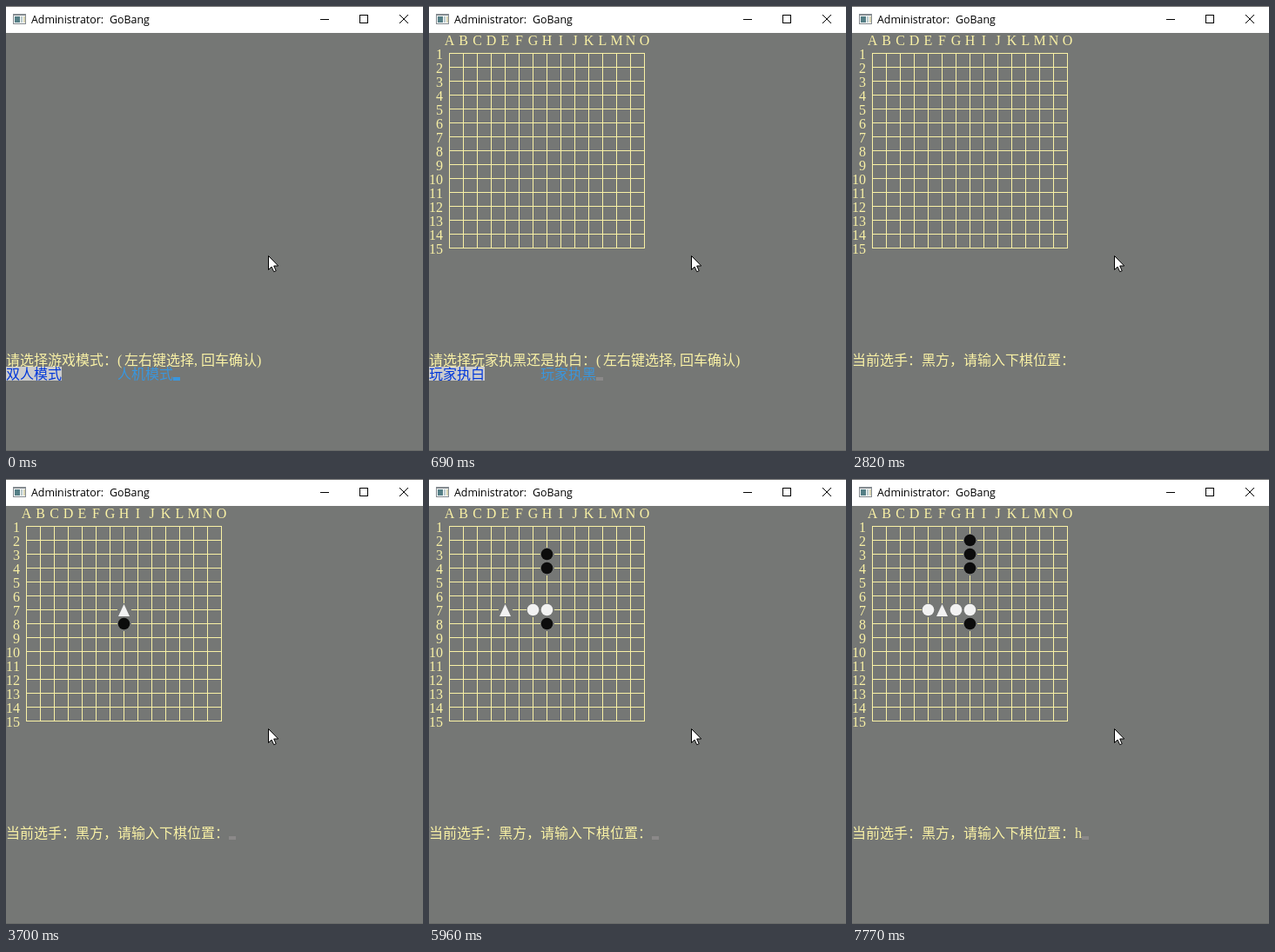
Write an HTML page with a canvas that moves like this. It is 479 px wide and 512 px high and loops after 8000 ms.

```html
<!DOCTYPE html>
<html lang="zh-CN">
<head>
<meta charset="utf-8">
<title>GoBang</title>
<style>
  html, body { margin: 0; width: 100%; height: 100%; overflow: hidden; background: #757775; }
  canvas { display: block; }
</style>
</head>
<body>
<canvas id="stage" width="479" height="512"></canvas>
<script>
const ctx = document.getElementById('stage').getContext('2d');
const LOOP = 8000, TOP = 31, CELL = 16, SIZE = 15;
const BG = '#757775', CREAM = '#f9f1a5', BLUE = '#3a96dd', NAVY = '#0037da',
      SILVER = '#cccccc', CARET = '#8b8989', BLACK = '#0c0c0c', WHITE = '#f2f2f2';
const FONT = '300 16px "Liberation Serif", "Noto Sans CJK SC", "Noto Sans CJK", serif';
const PROMPT_ROW = 23;
const HINT = '(左右键选择,回车确认)';

// Each turn: time, black move, white reply
const turns = [
  [3630, 'H8', 'H7'],
  [5090, 'H4', 'G7'],
  [5960, 'H3', 'E7'],
  [7510, 'H2', 'F7'],
];

// Prompt input over time; null hides the caret
const typing = [
  [1890, ''], [2820, null], [3020, 'h'], [3170, 'h8'], [3700, ''],
  [4500, 'h'], [4690, 'h4'], [5090, ''], [5220, null], [5290, ''],
  [5370, 'h'], [5550, 'h3'], [5960, ''], [6910, 'h'], [7050, 'h2'],
  [7510, ''], [7770, 'h'],
];

function rect(x, y, w, h, color) {
  ctx.fillStyle = color;
  ctx.fillRect(x, y, w, h);
}

function path(points, close) {
  ctx.beginPath();
  points.forEach(([x, y]) => ctx.lineTo(x, y));
  if (close) ctx.closePath();
}

// Console text: ASCII takes half a cell, everything else a full one
function print(text, x, row, color = CREAM) {
  ctx.font = FONT;
  ctx.fillStyle = color;
  for (const ch of text) {
    ctx.fillText(ch, x, TOP + row * CELL + 14);
    x += ch < '\x80' ? 8 : 16;
  }
  return x;
}

function caret(x, row, color = CARET) {
  rect(x, TOP + row * CELL + 12, 8, 4, color);
}

function titleBar() {
  rect(0, 0, 479, 31, '#fff');
  rect(0, 0, 479, 1, '#707070');
  rect(8, 9, 15, 12, '#858b90');
  rect(9, 11, 13, 9, '#f4f6f6');
  rect(10, 12, 6, 7, '#557f86');
  rect(17, 12, 2, 7, '#b8c9cb');
  rect(20, 12, 2, 7, '#d9d6b5');
  ctx.font = '12.4px "Open Sans", "Noto Sans", sans-serif';
  ctx.fillStyle = '#000';
  ctx.fillText('Administrator:', 29, 20);
  ctx.fillText('GoBang', 119, 20);
  rect(361, 15, 10, 1, '#000');
  ctx.strokeStyle = '#000';
  ctx.lineWidth = 1;
  ctx.strokeRect(406.5, 10.5, 9, 9);
  for (const [a, b] of [[10, 20], [20, 10]]) {
    path([[452, a], [462, b]]);
    ctx.stroke();
  }
}

function board(rows) {
  ctx.textAlign = 'center';
  for (let i = 0; i < SIZE; i++) {
    print(String.fromCharCode(65 + i), 23.5 + i * CELL, 0);
  }
  ctx.textAlign = 'left';
  const bottom = rows < SIZE ? 54 + rows * CELL - 8 : 54 + (SIZE - 1) * CELL;
  for (let i = 0; i < SIZE; i++) {
    rect(23 + i * CELL, 54, 1, bottom - 53, CREAM);
  }
  for (let r = 1; r <= rows; r++) {
    rect(23, 38 + r * CELL, 225, 1, CREAM);
    print(String(r), r < 10 ? 8 : 0, r);
  }
}

function piece(spot, color, latest) {
  const x = (spot.charCodeAt(0) - 64) * CELL;
  const y = TOP + spot.slice(1) * CELL;
  rect(x, y, CELL, CELL, BG);
  ctx.fillStyle = color;
  if (latest) {
    path([[x + 7.5, y + 1], [x + 14, y + 15], [x + 1, y + 15]], true);
  } else {
    ctx.beginPath();
    ctx.arc(x + 7.5, y + 7.5, 6.8, 0, 7);
  }
  ctx.fill();
}

// chosen: index of the highlighted item, or -1 for plain text
function menu(question, items, chosen, caretColor) {
  print(question + HINT, 0, PROMPT_ROW);
  items.forEach((item, i) => {
    const on = i === chosen, x = i * 128;
    if (on) rect(x, TOP + 24 * CELL, 64, CELL, SILVER);
    print(item, x, 24, chosen < 0 ? CREAM : on ? NAVY : BLUE);
  });
  if (chosen >= 0) caret(192, 24, caretColor);
}

function pointer() {
  path([[301.5, 287.5], [301.5, 303.5], [305, 300], [307.7, 305.7],
        [310.2, 304.7], [307.7, 299], [312.7, 299]], true);
  ctx.fillStyle = '#fff';
  ctx.fill();
  ctx.strokeStyle = '#000';
  ctx.lineWidth = 1;
  ctx.stroke();
}

function draw(t) {
  rect(0, 0, 479, 512, BG);
  rect(0, 511, 479, 1, '#686a68');
  titleBar();
  if (t >= 630) board(t < 690 ? 2 : SIZE);

  if (t < 690) {
    menu('请选择游戏模式：', ['双人模式', '人机模式'], t < 70 ? 0 : t < 630 ? 1 : -1, BLUE);
  } else if (t < 1890) {
    menu('请选择玩家执黑还是执白：', ['玩家执白', '玩家执黑'], t < 1490 ? 0 : t < 1820 ? 1 : -1, CARET);
  } else {
    const input = typing.filter(e => e[0] <= t).pop()[1];
    const end = print('当前选手：黑方，请输入下棋位置：' + (input || ''), 0, PROMPT_ROW);
    if (input !== null) caret(end, PROMPT_ROW);
  }

  const played = turns.filter(e => e[0] <= t);
  played.forEach(([, black, white], i) => {
    piece(black, BLACK, false);
    piece(white, WHITE, i === played.length - 1);
  });
  pointer();
}

const start = performance.now();
function tick() {
  draw((performance.now() - start) % LOOP);
  requestAnimationFrame(tick);
}
tick();
</script>
</body>
</html>
```
